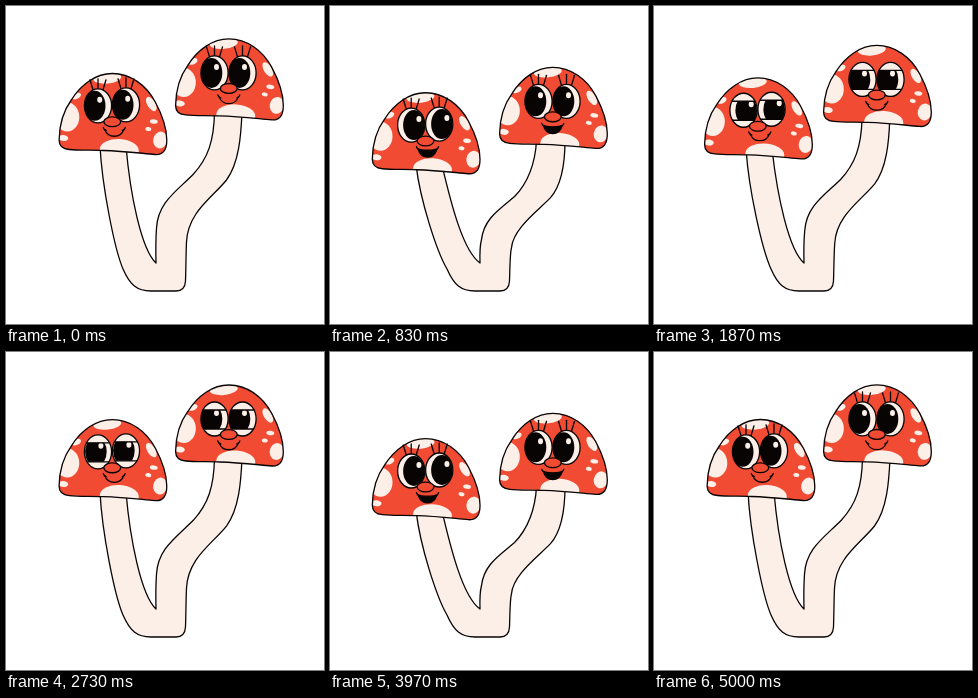
These frames come from a looping animation (318x318 px, 5.03 s). An HTML page with a canvas:

```html
<!DOCTYPE html>
<html lang="en">
<head>
<meta charset="utf-8">
<title>Mushrooms</title>
<style>
html, body { margin: 0; width: 100%; height: 100%; overflow: hidden; background: #fff; }
canvas { display: block; width: 318px; height: 318px; }
</style>
</head>
<body>
<canvas id="stage"></canvas>
<script>
const LOOP = 5030, HALF = LOOP / 2;
const RED = '#f24b33', CREAM = '#fcefe8', INK = '#080404';
const canvas = document.getElementById('stage');
const ctx = canvas.getContext('2d');
const scale = window.devicePixelRatio || 1;
canvas.width = canvas.height = 318 * scale;

const capShape = new Path2D('M.8 67C1 53 5 38 13 27C23 11 38 .5 54 .5C72 .5 88 12 97 29C105 44 108.500 57 108.500 67C108.500 77 105 82 97 81.500C80 80 65 78 45 77.500C30 77 20 77.500 11 76.500C4 76 .8 73 .8 67Z');
// x, y, rx, ry, tilt
const spots = [
  [49, 5, 14, 5.5, -.1], [9, 44, 12, 14.5, 0], [18, 23, 5, 3, -.4],
  [5, 65, 5, 3, .1], [61, 77, 19.5, 11, .06], [93, 31, 4, 8, -.55],
  [102, 67, 7, 8.5, .2], [95.5, 48.5, 4, 2.2, .15], [90, 56, 3, 2, .2]
];

// Sine ease from 0 to 1 between a and b
const ease = (t, a, b) => {
  const k = Math.min(1, Math.max(0, (t - a) / (b - a)));
  return .5 - .5 * Math.cos(Math.PI * k);
};
const pulse = (t, a, b, c, d) => ease(t, a, b) - ease(t, c, d);

function paint(path, fill, width = 1.3) {
  if (fill) { ctx.fillStyle = fill; ctx.fill(path); }
  if (width) { ctx.lineWidth = width; ctx.strokeStyle = INK; ctx.stroke(path); }
}

function oval(x, y, rx, ry, tilt = 0) {
  const path = new Path2D();
  path.ellipse(x, y, rx, ry, tilt, 0, 7);
  return path;
}

function line(x1, y1, x2, y2) {
  const path = new Path2D();
  path.moveTo(x1, y1);
  path.lineTo(x2, y2);
  paint(path, null);
}

function stems(p) {
  // Points move less the nearer they are to the base
  const pt = (x, y, dx = 0, dy = 0) => `${x + dx * p} ${y + dy * p} `;
  paint(new Path2D(
    'M' + pt(94, 140, -8, 20) +
    'C' + pt(96, 180, -6, 14) + pt(108.5, 243, -2, 2) + pt(117, 263) +
    'C' + pt(124, 279) + pt(131, 285) + pt(145, 285) +
    'L' + pt(170, 285) +
    'Q' + pt(179, 285) + pt(179.5, 275) +
    'C' + pt(180, 260) + pt(180, 247) + pt(180.5, 236, 1, 6) +
    'C' + pt(182, 206, 1, 17) + pt(206, 192, 2, 13) + pt(220.5, 174, 0, 18) +
    'C' + pt(233, 157, -2, 23) + pt(235, 130, 0, 29) + pt(236, 106, -1, 29) +
    'L' + pt(208.5, 106, -2, 29) +
    'C' + pt(208, 135, -3, 25) + pt(202, 152, -4, 25) + pt(187.5, 168, -3, 23) +
    'C' + pt(171, 185, -2, 19) + pt(152, 196, 2, 17) + pt(150.5, 222, 1, 12) +
    'Q' + pt(149.5, 237, 0, 4) + pt(150, 257) +
    'C' + pt(135, 243, -2, 2) + pt(124, 187, -3, 11) + pt(120, 140, -8, 20) + 'Z'
  ), CREAM);
}

function eye(x, y, look, lid) {
  const rx = 13.6, ry = 17;
  const top = -ry + 8 * lid, bottom = ry - 7 * lid;
  const white = oval(0, 0, rx, ry);
  ctx.save();
  ctx.translate(x, y);
  if (lid < .9) {
    for (const side of [-1, 0, 1])
      line(side * 5, 1 - ry, side * 8, -ry - 10 * (1 - lid) + Math.abs(side));
  }
  paint(white, CREAM, 0);
  ctx.save();
  ctx.beginPath();
  ctx.rect(-rx, top, 2 * rx, bottom - top);
  ctx.clip();
  ctx.clip(white);
  paint(oval(look, 0, 10.8, 15), INK, 0);
  paint(oval(look + 5, -6, 2.5, 3), CREAM, 0);
  ctx.restore();
  if (lid > .05) {
    for (const level of [top, bottom]) {
      const edge = rx * Math.sqrt(1 - (level / ry) ** 2);
      line(-edge, level, edge, level);
    }
  }
  paint(white, null);
  ctx.restore();
}

function mouth(x, y, open) {
  const path = new Path2D();
  const curve = (from, depth) => path.bezierCurveTo(x - from * 6.5, y + depth, x + from * 6.5, y + depth, x + from * 9.5, y);
  path.moveTo(x - 9.5, y);
  curve(1, 9 + 2 * open);
  if (open > .03) curve(-1, 9 - 7 * open);
  paint(path, open > .03 ? INK : null);
  for (const side of [-1, 1]) {
    const cheek = new Path2D();
    cheek.moveTo(x + side * 8, y + 1);
    cheek.quadraticCurveTo(x + side * 10, y + 1, x + side * 11, y - 2);
    paint(cheek, null);
  }
}

function head(x, y, face, look, pose) {
  ctx.save();
  ctx.translate(x, y);
  paint(capShape, RED, 0);
  ctx.save();
  ctx.clip(capShape);
  for (const spot of spots) paint(oval(...spot), CREAM, 0);
  ctx.restore();
  paint(capShape, null);
  eye(39.7, face.eyeY, look, pose.lid);
  eye(67.7, face.eyeY - face.tilt, look, pose.lid);
  mouth(face.mouthX, face.mouthY, pose.open);
  paint(oval(54, face.noseY, 8.4, 4.9), RED);
  ctx.restore();
}

const leftFace = { eyeY: 32.8, tilt: 1, noseY: 48.8, mouthX: 56, mouthY: 56.5 };
const rightFace = { eyeY: 34.5, tilt: 0, noseY: 50, mouthX: 54, mouthY: 58.5 };

function draw(now) {
  const t = now % LOOP, h = t % HALF;
  const dip = pulse(h, 192, 892, 1392, 2092);
  const glance = pulse(h, 70, 560, 2000, 2490);
  const pose = {
    lid: pulse(t, 1480, 1780, 3160, 3400) + pulse(t, 4560, 4700, 4780, 5000),
    open: pulse(h, 640, 830, 1450, 1700)
  };
  ctx.setTransform(scale, 0, 0, scale, 0, 0);
  ctx.fillStyle = '#fff';
  ctx.fillRect(0, 0, 318, 318);
  ctx.lineCap = ctx.lineJoin = 'round';
  stems(dip);
  head(52.3 - 11 * dip, 67 + 19.6 * dip, leftFace, 6 * glance - 3.3, pose);
  head(168.8, 32.4 + 29 * dip, rightFace, -3, pose);
}

const start = performance.now();
function tick() {
  draw(performance.now() - start);
  requestAnimationFrame(tick);
}
tick();
</script>
</body>
</html>
```
